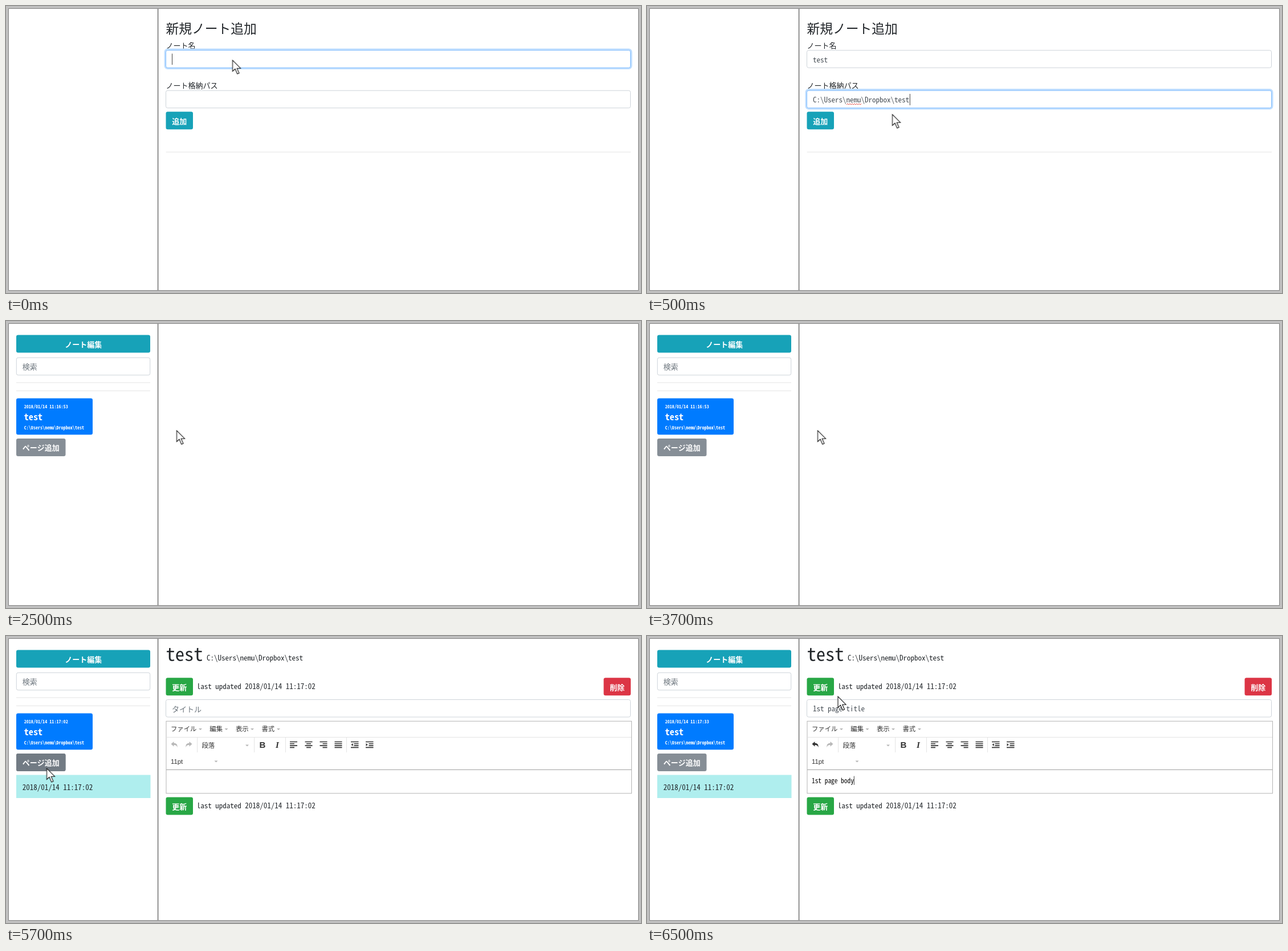
An HTML page that plays this animation: 1114 by 503 pixels, repeating every 8000 ms.

```html
<!DOCTYPE html>
<html lang="ja">
<head>
<meta charset="utf-8">
<title>ノート</title>
<style>
html, body { margin: 0; width: 100%; height: 100%; overflow: hidden; background: #c0c0c0; }
svg { display: block; width: 1114px; height: 503px; }
text { font: 13px "Noto Sans Mono CJK JP", "Noto Sans CJK JP", "Noto Sans Mono", monospace; fill: #212529; }
.h2 { font-size: 22.75px; }
.h1 { font-size: 32.5px; }
.h4 { font-size: 16.25px; }
.tiny { font-size: 8.125px; }
.btn text, .card text { fill: #fff; font-weight: 700; }
.mid { text-anchor: middle; }
.value { fill: #495057; }
.hint { fill: #6c757d; }
.field { fill: #fff; stroke: #ced4da; }
.focus { fill: #fff; stroke: #80bdff; }
.ring { fill: none; stroke: #bfdeff; stroke-width: 3; }
.rule { stroke: #e4e4e4; }
.caret { stroke: #444; }
.info { fill: #17a2b8; }
.ok { fill: #28a745; }
.bad { fill: #dc3545; }
.menu text { font: 11.375px "Noto Sans CJK JP", "Noto Sans", sans-serif; fill: #333; }
.menu .size { font-family: "Liberation Sans", sans-serif; }
.menu .glyph { font: 700 15px "Liberation Sans", sans-serif; }
.menu .slant { font: italic 700 15px "Liberation Serif", serif; }
.icons { stroke: #333; stroke-width: 1.6; fill: none; }
.body { font-size: 11.375px; fill: #000; }

/* One loop of 8 s with hard cuts at 0.5, 2.5, 4.5 and 6.5 s */
[class^="at-"], #pointer, #undo { animation: 8s step-end infinite; }
.at-empty { animation-name: empty; }
.at-filled { animation-name: filled; }
.at-form { animation-name: form; }
.at-list { animation-name: list; }
.at-side { animation-name: side; }
.at-new { animation-name: new; }
.at-edit { animation-name: edit; }
.at-typed { animation-name: typed; }
#pointer { animation-name: pointer; }
#undo { animation-name: undo; }
@keyframes empty { 0% { visibility: visible } 6.25%, 100% { visibility: hidden } }
@keyframes filled { 0% { visibility: hidden } 6.25% { visibility: visible } 31.25%, 100% { visibility: hidden } }
@keyframes form { 0% { visibility: visible } 31.25%, 100% { visibility: hidden } }
@keyframes list { 0% { visibility: hidden } 31.25% { visibility: visible } 56.25%, 100% { visibility: hidden } }
@keyframes side { 0% { visibility: hidden } 31.25%, 100% { visibility: visible } }
@keyframes new { 0% { visibility: hidden } 56.25% { visibility: visible } 81.25%, 100% { visibility: hidden } }
@keyframes edit { 0% { visibility: hidden } 56.25%, 100% { visibility: visible } }
@keyframes typed { 0% { visibility: hidden } 81.25%, 100% { visibility: visible } }
@keyframes undo { 0% { color: #b8b8b8 } 81.25%, 100% { color: #333 } }
@keyframes pointer {
  0% { transform: translate(397.5px, 95px) }
  6.25% { transform: translate(430.5px, 190px) }
  31.25% { transform: translate(299.5px, 192px) }
  56.25% { transform: translate(71.5px, 232px) }
  81.25%, 100% { transform: translate(335px, 106px) }
}
</style>
</head>
<body>
<svg viewBox="0 0 1114 503">
  <defs>
    <path id="drop" d="M0 0h6l-3 3z" fill="#b5b5b5"/>
    <path id="turn" d="M0 4.3L5 0v2.8c4.2 0 6.6 2 6 7.7c-.9-3.3-2.6-4.4-6-4.4v2.7z"/>
    <rect id="wide" x="280.5" width="815" height="30.5" rx="3"/>
    <rect id="small" width="47.5" height="31" rx="3.25"/>
  </defs>

  <rect x="4.5" y="4.5" width="1105" height="494" fill="#fff" stroke="#858585"/>
  <path d="M266.6 5V498" stroke="#707070" stroke-width="1.5"/>

  <!-- New note form -->
  <g class="at-form">
    <text class="h2" x="280.5" y="47.5">新規ノート追加</text>
    <text x="280.5" y="73.5">ノート名</text>
    <text x="280.5" y="143.7">ノート格納パス</text>
    <g class="field"><use href="#wide" y="77.7"/><use href="#wide" y="148.2"/></g>
    <g class="btn">
      <use href="#small" x="280.5" y="185.3" class="info"/>
      <text class="mid" x="304.3" y="206.5">追加</text>
    </g>
    <path class="rule" d="M280.5 256H1096"/>
  </g>
  <g class="at-empty">
    <rect class="ring" x="279" y="76" width="818" height="33.5" rx="4.5"/>
    <use href="#wide" y="77.7" class="focus"/>
    <path class="caret" d="M291.5 83.5V103"/>
  </g>
  <g class="at-filled">
    <rect class="ring" x="279" y="146.5" width="818" height="33.5" rx="4.5"/>
    <use href="#wide" y="148.2" class="focus"/>
    <text class="value" x="291" y="98.5">test</text>
    <text class="value" x="291" y="168.7">C:\Users\nemu\Dropbox\test</text>
    <path d="M350 173l2-2l2 2l2-2l2 2l2-2l2 2l2-2l2 2l2-2l2 2l2-2l2 2l2-2" fill="none" stroke="#e0423a" stroke-width=".9"/>
    <path class="caret" d="M461.3 154V174"/>
  </g>

  <!-- Sidebar -->
  <g class="at-side">
    <g class="btn">
      <rect class="info" x="18" y="24.5" width="235" height="31" rx="3.25"/>
      <text class="mid" x="135.7" y="45.5">ノート編集</text>
    </g>
    <rect class="field" x="18.3" y="64.3" width="234.4" height="30.5" rx="3"/>
    <text class="hint" x="28.7" y="85">検索</text>
    <path class="rule" d="M18 108H253M18 122.3H253"/>
    <g class="card">
      <rect x="18" y="135.5" width="134" height="63.7" rx="3.25" fill="#007bff"/>
      <text class="h4" x="31.7" y="174">test</text>
      <text class="tiny" x="31.7" y="189.5">C:\Users\nemu\Dropbox\test</text>
      <g class="at-list"><text class="tiny" x="31.7" y="152.7">2018/01/14 11:16:53</text></g>
      <g class="at-new"><text class="tiny" x="31.7" y="152.7">2018/01/14 11:17:02</text></g>
      <g class="at-typed"><text class="tiny" x="31.7" y="152.7">2018/01/14 11:17:33</text></g>
    </g>
    <g class="btn">
      <rect x="18" y="206" width="86.5" height="31" rx="3.25" fill="#868e96"/>
      <g class="at-new"><rect x="18" y="206" width="86.5" height="31" rx="3.25" fill="#727b84"/></g>
      <text x="28.7" y="227">ページ追加</text>
    </g>
  </g>

  <!-- Page editor -->
  <g class="at-edit">
    <rect x="18" y="243.5" width="235.5" height="40.5" fill="#afeeee"/>
    <text x="28.7" y="269.7">2018/01/14 11:17:02</text>
    <text class="h1" x="280.5" y="43.5">test</text>
    <text x="352" y="42.5">C:\Users\nemu\Dropbox\test</text>
    <g class="btn">
      <use href="#small" x="280.5" y="73.3" class="ok"/>
      <use href="#small" x="280.5" y="282.5" class="ok"/>
      <use href="#small" x="1048.5" y="73.3" class="bad"/>
      <text class="mid" x="304.3" y="94.5">更新</text>
      <text class="mid" x="304.3" y="303.7">更新</text>
      <text class="mid" x="1072.3" y="94.5">削除</text>
    </g>
    <text x="334.7" y="92.5">last updated 2018/01/14 11:17:02</text>
    <text x="334.7" y="301.5">last updated 2018/01/14 11:17:02</text>
    <use href="#wide" y="111.5" class="field"/>

    <g class="menu">
      <rect x="281" y="149.3" width="816.5" height="126.5" fill="#fff" stroke="#b5b5b5"/>
      <path d="M281 234.3H1097.5" stroke="#b0b0b0" stroke-width="1.3"/>
      <path class="rule" d="M281.5 177.5H1097M335.5 178V204M435.5 178V204M490.5 178V204M597.5 178V204"/>
      <text x="289" y="167.3">ファイル</text><use href="#drop" x="338" y="162"/>
      <text x="357.3" y="167.3">編集</text><use href="#drop" x="383.5" y="162"/>
      <text x="403" y="167.3">表示</text><use href="#drop" x="429" y="162"/>
      <text x="448.5" y="167.3">書式</text><use href="#drop" x="475" y="162"/>
      <text x="343.5" y="196">段落</text><use href="#drop" x="420" y="190.5"/>
      <text class="size" x="289" y="223.7">11pt</text><use href="#drop" x="365.5" y="218.5"/>
      <g id="undo"><use href="#turn" x="289.5" y="185" fill="currentColor"/></g>
      <use href="#turn" transform="translate(326.5 185) scale(-1 1)" fill="#b8b8b8"/>
      <text class="glyph mid" x="450" y="195.7">B</text>
      <text class="slant mid" x="476" y="195.7">I</text>
      <g class="icons">
        <path d="M498 185.5h13m-13 3.3h8m-8 3.3h13m-13 3.3h8"/>
        <path d="M524.5 185.5h13m-10.5 3.3h8m-10.5 3.3h13m-10.5 3.3h8"/>
        <path d="M550.5 185.5h13m-8 3.3h8m-13 3.3h13m-8 3.3h8"/>
        <path d="M576.5 185.5h13m-13 3.3h13m-13 3.3h13m-13 3.3h13"/>
        <path d="M605 185.5h13.5m-8 3.3h8m-8 3.3h8m-13.5 3.3h13.5"/>
        <path d="M631 185.5h13.5m-8 3.3h8m-8 3.3h8m-13.5 3.3h13.5"/>
        <path d="M608.7 188v5l-3.2-2.5zM631.5 188v5l3.2-2.5z" fill="#333" stroke="none"/>
      </g>
    </g>
  </g>
  <g class="at-new"><text class="hint" x="291" y="132.5">タイトル</text></g>
  <g class="at-typed">
    <text class="value" x="291" y="132.3">1st page title</text>
    <text class="body" x="289" y="258.2">1st page body</text>
    <path class="caret" d="M363.3 245.5V261"/>
  </g>

  <g id="pointer">
    <path d="M0 0V19.5L4.5 15.3L8.3 24L11.5 22.7L7.8 14.2H14Z" fill="#fff" stroke="#111" stroke-width="1.1"/>
  </g>
</svg>
</body>
</html>
```
